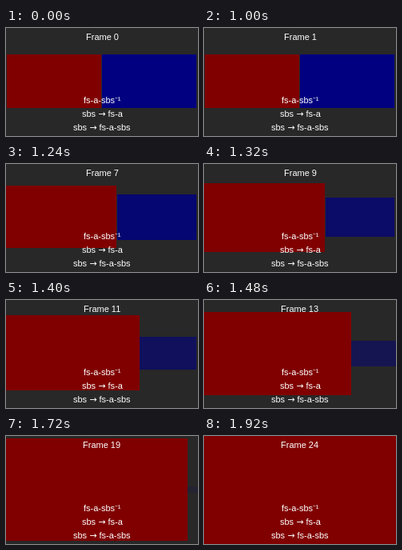
An HTML page with a canvas for the animation above (2.92 s loop, 240 by 135 pixels).

```html
<!DOCTYPE html>
<html lang="en">
<head>
<meta charset="utf-8">
<title>Side by side to fullscreen</title>
<style>
  html, body { margin: 0; width: 100%; height: 100%; overflow: hidden; background: #282828; }
  canvas { display: block; width: 240px; height: 135px; }
</style>
</head>
<body>
<canvas id="stage" width="240" height="135"></canvas>
<script>
const W = 240, H = 135;
const HOLD = 1000, STEP = 40, LAST = 24, LOOP = 2920;
const TEXT_FONT = '11px "Liberation Sans", Arial, sans-serif';
const ARROW_FONT = '11px "DejaVu Sans", sans-serif';
const ctx = document.getElementById('stage').getContext('2d');

// Whole-pixel box: left, top, width, height
const box = (x, y, size) => [x * W, y * H, size * W, size * H].map(Math.floor);
const redFrom = box(0.008, 0.25, 0.49), redTo = box(0, 0, 1);
const blueFrom = box(0.503, 0.25, 0.49), blueTo = box(1, 0.5, 0);

const labels = [['fs-a-sbs\u207b\u00b9', 94], ['sbs \u2192 fs-a', 111], ['sbs \u2192 fs-a-sbs', 128]];

const ease = p => (1 - Math.cos(Math.PI * p)) / 2;

// Edges are inclusive, so each side gains one pixel
function fillBox(from, to, s, color, alpha) {
  const [x, y, w, h] = from.map((v, i) => v + (to[i] - v) * s);
  ctx.globalAlpha = alpha;
  ctx.fillStyle = color;
  ctx.fillRect(Math.floor(x), Math.floor(y), Math.round(w) + 1, Math.round(h) + 1);
  ctx.globalAlpha = 1;
}

function drawText(text, y) {
  const runs = text.split(/(\u2192)/).map(part => {
    const font = part === '\u2192' ? ARROW_FONT : TEXT_FONT;
    ctx.font = font;
    return { part, font, width: ctx.measureText(part).width };
  });
  let x = Math.round((W - runs.reduce((sum, run) => sum + run.width, 0)) / 2);
  for (const { part, font, width } of runs) {
    ctx.font = font;
    ctx.fillText(part, x, y);
    x += width;
  }
}

function draw(time) {
  const t = time % LOOP;
  const count = t < HOLD ? 0 : Math.min(LAST, Math.floor((t - HOLD) / STEP) + 1);
  const s = ease(Math.max(0, count - 1) / (LAST - 1));

  ctx.fillStyle = '#282828';
  ctx.fillRect(0, 0, W, H);
  fillBox(redFrom, redTo, s, '#800000', 1);
  fillBox(blueFrom, blueTo, s, '#000080', 1 - s);

  ctx.fillStyle = '#fff';
  drawText('Frame ' + count, 15);
  for (const [text, y] of labels) drawText(text, y);
}

const start = performance.now();
function tick() {
  draw(performance.now() - start);
  requestAnimationFrame(tick);
}
tick();
</script>
</body>
</html>
```
